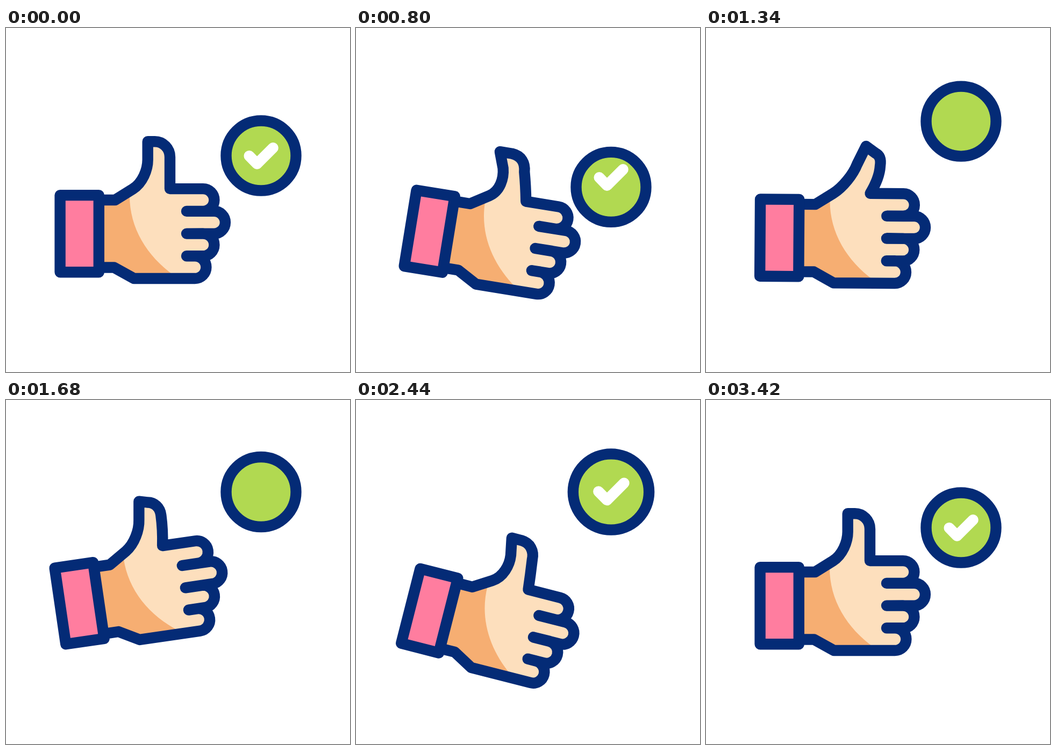
Animation, 640 px wide and 640 px high, one loop 3600 ms. Source, as an HTML page with a canvas:

```html
<!DOCTYPE html>
<html lang="en">
<head>
<meta charset="utf-8">
<title>Thumbs up</title>
<style>
  html, body { margin: 0; width: 100%; height: 100%; overflow: hidden; background: #fff; }
  canvas { display: block; width: 640px; height: 640px; }
</style>
</head>
<body>
<canvas id="stage" width="640" height="640"></canvas>
<script>
const ctx = document.getElementById('stage').getContext('2d');
const LOOP = 3600, SWING = 520;
const NAVY = '#042b76', PINK = '#ff7d9f', GREEN = '#b1d951';
const SKIN = '#fddfbd', SHADE = '#f6ae72';
const STROKE = 20.4;

function ease(u) {
  const x = Math.min(1, Math.max(0, u));
  return (1 - Math.cos(Math.PI * x)) / 2;
}

// Eases from 0 to 1 after `start`, and is back at 0 by `end`.
function pulse(t, start, end, rise = SWING, fall = SWING) {
  return ease((t - start) / rise) - ease((t - end + fall) / fall);
}

function poseAt(t) {
  return {
    angle: 23 * (pulse(t, 450, 1560) + pulse(t, 1965, 3050)) - 8.3 * pulse(t, 80, 3050, 370),
    lift: 14.5 * (pulse(t, 740, 1740, 490) + pulse(t, 1960, 3110, 490)) - 5 * pulse(t, 80, 3110),
    lean: 58 * pulse(t, 700, 2150, 620, 830) - 25 * pulse(t, 80, 2720, 620, 570),
    badgeY: 237.5 + 79.5 * pulse(t, 80, 1410, SWING, 810) - 66.5 * pulse(t, 600, 3410, 810, 626),
    radius: 65 + 14.3 * pulse(t, 2220, 3070, 510, 330),
    tickY: 20 * pulse(t, 80, 2280, SWING, 220) - 110 * pulse(t, 600, 2055, 500, 455),
    tickGrow: 1.3 * pulse(t, 2320, 3100, 460, 320)
  };
}

function stroke(path, color = NAVY, width = STROKE) {
  ctx.strokeStyle = color;
  ctx.lineWidth = width;
  ctx.stroke(path);
}

function fill(path, color) {
  ctx.fillStyle = color;
  ctx.fill(path);
}

function addFingers(path) {
  const radius = 20.9;
  [366.5, 387, 366.5, 351.5].forEach((x, i) => {
    const y = 320 + i * 41.7;
    path.arc(x, y, radius, -Math.PI / 2, Math.PI / 2);
    if (i < 3) path.lineTo(336, y + radius);
  });
}

// The thumb bends by `lean`: positive to the right, negative to the left.
function handPath(lean) {
  const bent = lean > 0;
  const side = lean * (bent ? 1.15 : 0.55);
  const drop = Math.abs(lean) * (bent ? 0.4 : 0.2);
  const p = new Path2D();
  p.moveTo(173, 320);
  p.lineTo(203, 320);
  p.lineTo(236, 299.5);
  p.bezierCurveTo(254, 288, 263.7 + 0.28 * lean, 264, 263.7 + 0.5 * lean, 245);
  p.lineTo(263.7 + lean, 211.2 + (bent ? 0 : drop));
  p.lineTo(277 + side, 211.2 + drop);
  p.bezierCurveTo(
    292.5 + 0.8 * side, 211.2 + 1.3 * drop,
    305 + 0.6 * lean, 224 + drop,
    305 + 0.55 * lean, 240 + 0.25 * Math.abs(lean));
  p.quadraticCurveTo(305 + 0.45 * side, 270, 305, 299);
  addFingers(p);
  p.lineTo(238, 466);
  p.lineTo(201, 445.5);
  p.lineTo(173, 445.5);
  return p;
}

const shadePath = new Path2D('M160 290H230V312C230 372 262 424 312 460V480H160Z');
const cuffPath = new Path2D();
cuffPath.rect(100.6, 311.1, 72.2, 143.2);

function drawHand({ angle, lift, lean }) {
  const hand = handPath(lean);
  ctx.save();
  ctx.translate(136.7, 383 + lift);
  ctx.rotate(angle * Math.PI / 180);
  ctx.translate(-136.7, -383);
  fill(hand, SKIN);
  ctx.save();
  ctx.clip(hand);
  fill(shadePath, SHADE);
  ctx.restore();
  stroke(hand);
  fill(cuffPath, PINK);
  stroke(cuffPath);
  ctx.restore();
}

function drawBadge({ badgeY, radius, tickY, tickGrow }) {
  const disc = new Path2D();
  disc.arc(0, 0, radius, 0, 2 * Math.PI);
  const tick = new Path2D();
  tick.moveTo(-22 - 6.5 * tickGrow, 0.5 - 6.5 * tickGrow);
  tick.lineTo(-7.5, 15.3);
  tick.lineTo(22.3 + 9 * tickGrow, -14.5 - 9.3 * tickGrow);

  ctx.save();
  ctx.translate(474.5, badgeY);
  fill(disc, GREEN);
  ctx.save();
  ctx.clip(disc);
  ctx.translate(0, tickY);
  stroke(tick, '#fff', 20);
  ctx.restore();
  stroke(disc);
  ctx.restore();
}

const start = performance.now();
function draw() {
  const pose = poseAt((performance.now() - start) % LOOP);
  ctx.fillStyle = '#fff';
  ctx.fillRect(0, 0, 640, 640);
  ctx.lineCap = ctx.lineJoin = 'round';
  drawHand(pose);
  drawBadge(pose);
  requestAnimationFrame(draw);
}
draw();
</script>
</body>
</html>
```
